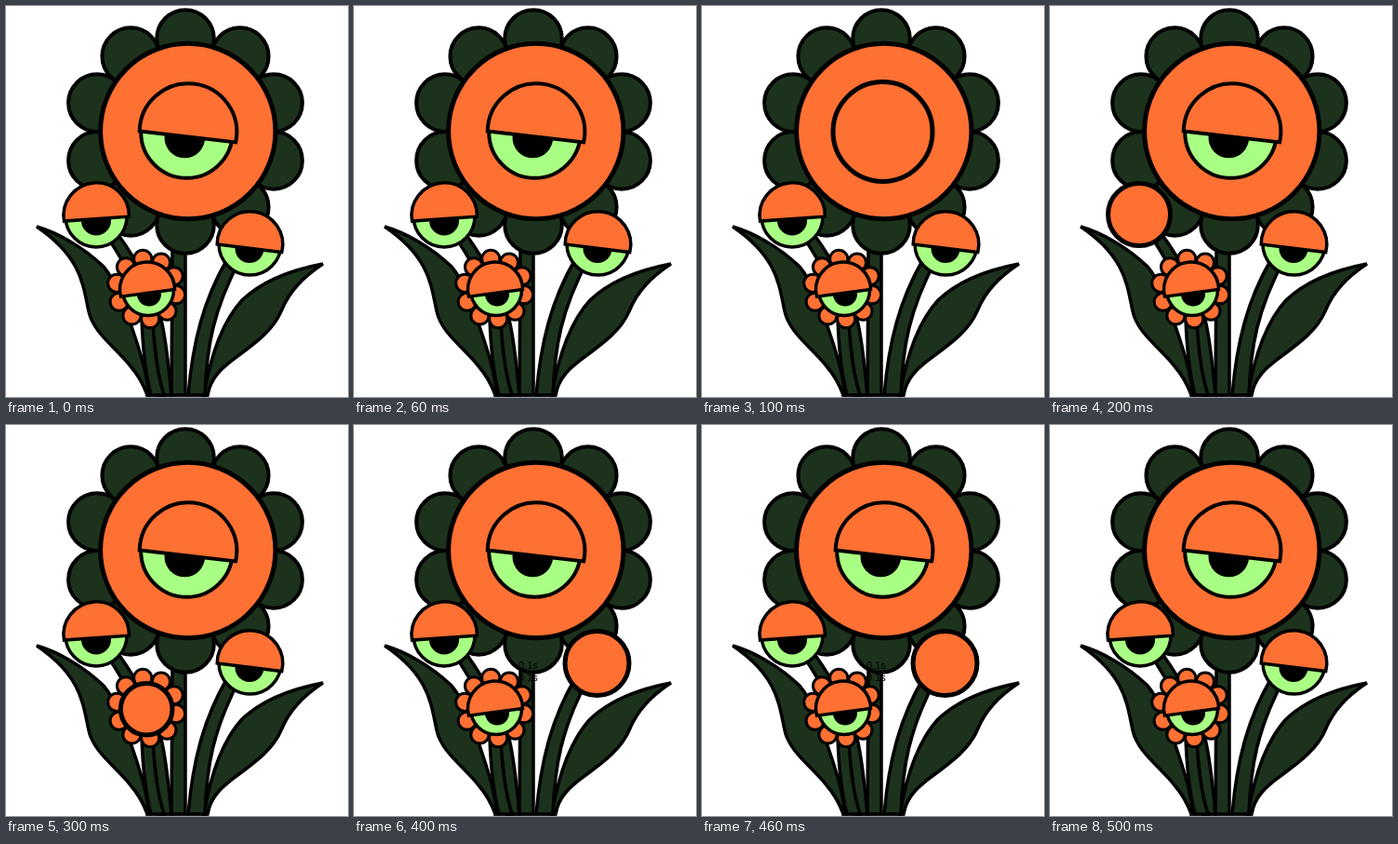
Animation of 368x420 px, one loop 600 ms. Source, as an HTML page:

```html
<!DOCTYPE html>
<html lang="en">
<head>
<meta charset="utf-8">
<title>Blinking flowers</title>
<style>
  html, body { margin: 0; width: 100%; height: 100%; overflow: hidden; background: #fff; }
  svg { display: block; width: 100vw; height: 100vh; }
  .leaf { fill: #1c321d; }
  .bloom { fill: #ff7033; }
  .iris { fill: #a9ff83; }
  .line { stroke: #000; stroke-linejoin: miter; }
  text { font: 11px "Liberation Sans", Arial, sans-serif; }
</style>
</head>
<body>
<svg id="stage" viewBox="0 0 368 420" xmlns="http://www.w3.org/2000/svg"></svg>
<script>
const stage = document.getElementById('stage');
const STEP = 100, STEPS = 6;

function add(parent, tag, attrs = {}) {
  const el = document.createElementNS('http://www.w3.org/2000/svg', tag);
  for (const key in attrs) el.setAttribute(key, attrs[key]);
  parent.appendChild(el);
  return el;
}

function disc(parent, cx, cy, r, kind, width) {
  return add(parent, 'circle', { cx, cy, r, class: kind + ' line', 'stroke-width': width });
}

function green(d, width = 3.5) {
  add(stage, 'path', { d, class: 'leaf line', 'stroke-width': width });
}

function polar(cx, cy, r, degrees) {
  const a = degrees * Math.PI / 180;
  return [cx + r * Math.cos(a), cy + r * Math.sin(a)];
}

function petals(cx, cy, ring, r, start, kind, width) {
  for (let i = 0; i < 10; i++) {
    disc(stage, ...polar(cx, cy, ring, start + i * 36), r, kind, width);
  }
}

// The lid is a circle cut by a chord whose ends sit at two angles.
function lidPath(cx, cy, r, left, right) {
  return `M${polar(cx, cy, r, left)}A${r} ${r} 0 ${+(360 + right - left > 180)} 1 ${polar(cx, cy, r, right)}Z`;
}

// An eye has an open drawing and a plain closed disc; blink is its closed step.
function eye({ ball, pupil, lid, shut, width, blink }) {
  const open = add(stage, 'g'), closed = add(stage, 'g');
  disc(open, ...ball, 'iris', width);
  const [cx, cy, r] = pupil;
  add(open, 'circle', { cx, cy, r });
  add(open, 'path', { d: lidPath(...lid), class: 'bloom line', 'stroke-width': width });
  disc(closed, ...shut, 'bloom', 5);
  return { open, closed, blink };
}

// Leaves and stems
green('M33 237C54 243 82 258 105 280C121 299 132 335 141 362C147 380 152 399 154 418L152 418C147 404 141 395 134 387C121 369 94 352 89 328C83 301 82 270 33 237Z');
green('M341 277C304 284 274 297 254 316C232 340 220 376 213 418L217 418C220 399 233 388 248 377C270 361 288 347 296 328C305 306 320 291 341 277Z');
green('M179 255L178 418L193 418L193 255Z');
green('M238 272C212 317 201 361 196 418L214 418C216 365 223 327 252 272Z');
green('M109 248C129 278 150 315 158 352C163 378 162 398 164 418L178 418C175 390 173 359 166 333C156 300 139 271 121 246Z');
green('M146 335C147 368 150 394 156 418L170 418C162 392 159 365 158 335Z');
add(stage, 'path', { d: 'M150 418H217', class: 'line', 'stroke-width': 3 });

// Large flower
petals(193, 135, 100, 30.8, -90, 'leaf', 4);
disc(stage, 195.8, 134.5, 94.2, 'bloom', 5);

const eyes = [
  eye({ ball: [194.5, 135.5, 49.3], pupil: [192.3, 141.5, 21.8], lid: [196, 135.5, 52.3, 181, 12],
        shut: [194.5, 135, 53.5], width: 4, blink: 1 }),
  eye({ ball: [97, 226, 33], pupil: [97, 230.5, 16], lid: [97.2, 225, 35.2, 170, 2],
        shut: [96, 224, 33.5], width: 3.5, blink: 2 }),
  eye({ ball: [262.5, 255.5, 33.5], pupil: [262, 260.5, 15.5], lid: [262.5, 256, 35.3, 180, 14],
        shut: [261.5, 256, 34.5], width: 3.5, blink: 4 })
];

// Small flower
petals(151.2, 304, 32.5, 9.6, -97, 'bloom', 3);
eyes.push(eye({ ball: [153, 305, 27.5], pupil: [154, 309.5, 13], lid: [152, 304.5, 29.5, 165, 0],
                shut: [151.2, 305.2, 27.8], width: 3.5, blink: 3 }));

const label = add(stage, 'g');
for (const y of [262, 275]) add(label, 'text', { x: 177, y }).textContent = '0.1s';

function show(el, on) {
  el.setAttribute('visibility', on ? 'visible' : 'hidden');
}

function draw(time) {
  const step = Math.floor(time / STEP) % STEPS;
  for (const { open, closed, blink } of eyes) {
    show(open, step !== blink);
    show(closed, step === blink);
  }
  show(label, step === 4);
}

const begin = performance.now();
function tick() {
  draw(performance.now() - begin);
  requestAnimationFrame(tick);
}
draw(0);
requestAnimationFrame(tick);
</script>
</body>
</html>
```
